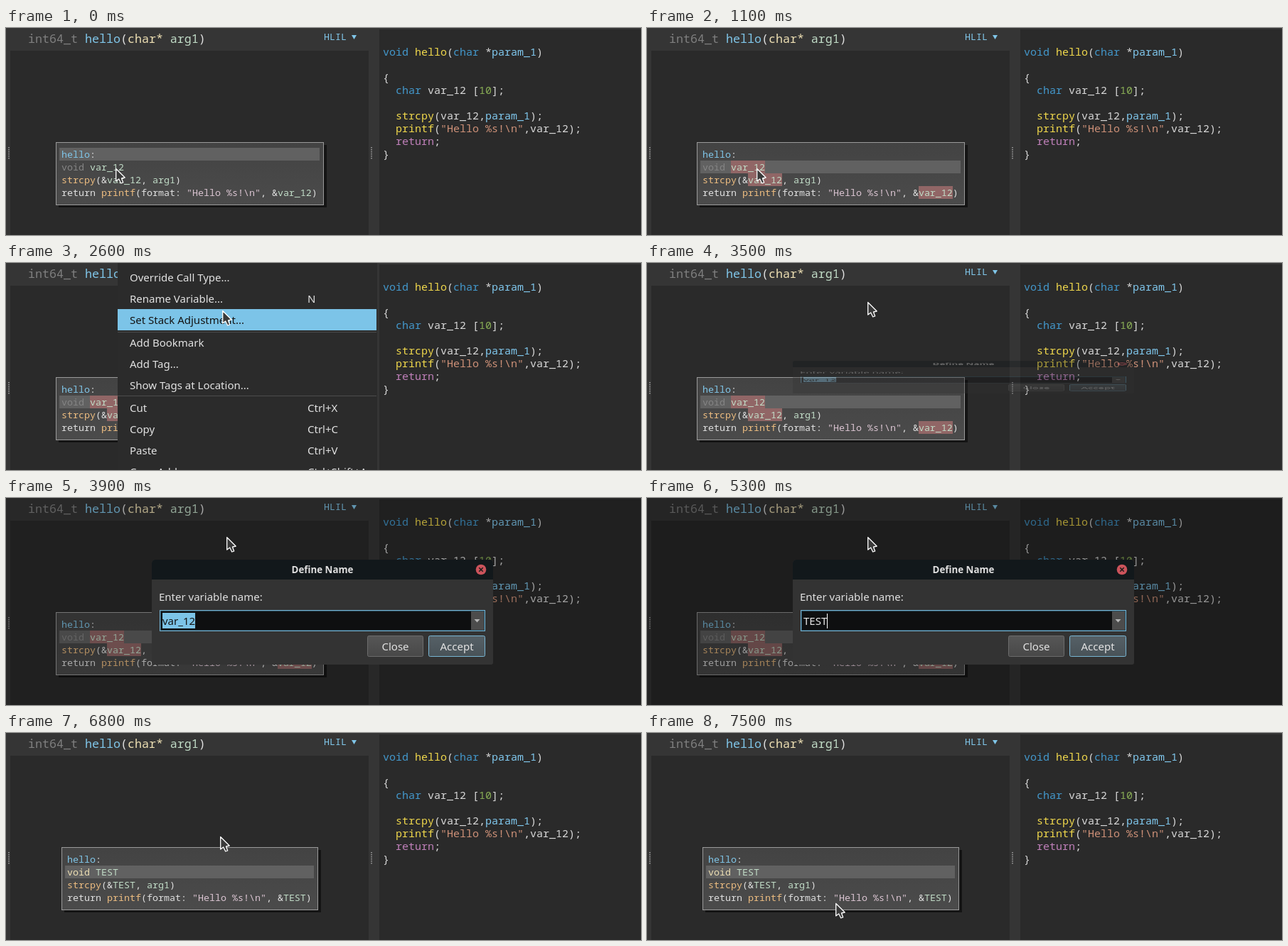
Write an HTML page with a canvas that moves like this. It is 893x292 px and loops after 8000 ms.

```html
<!DOCTYPE html>
<html lang="en">
<head>
<meta charset="utf-8">
<title>Rename a variable</title>
<style>
html, body { margin: 0; width: 100%; height: 100%; overflow: hidden; background: #2a2a2a; }
canvas { display: block; }
</style>
</head>
<body>
<canvas id="stage" width="893" height="292"></canvas>
<script>
const LOOP = 8000;
const MONO = '"Noto Sans Mono", "DejaVu Sans Mono", monospace';
const SANS = '"Noto Sans", "Open Sans", sans-serif';
const C = {
  text: '#e0e0e0', dim: '#7f7f7f', type: '#eddfb3', sym: '#80c6e9', vari: '#c1dcc7',
  imp: '#edbd81', str: '#dac4d1', kw: '#4398cc', fn: '#f0d84c', par: '#80c8ee',
  plain: '#d8d8d8', num: '#88ad55', lit: '#ce9178', ret: '#c080ba'
};
const screen = document.getElementById('stage').getContext('2d');
const layer = document.createElement('canvas');
layer.width = 893;
layer.height = 292;
const dialogCtx = layer.getContext('2d');
let g = screen;

function box(x, y, w, h, fill) {
  g.fillStyle = fill;
  g.fillRect(x, y, w, h);
}

function frame(x, y, w, h, color) {
  g.strokeStyle = color;
  g.lineWidth = 1;
  g.strokeRect(x + 0.5, y + 0.5, w - 1, h - 1);
}

function label(str, x, y, color, font, align = 'left') {
  g.font = font;
  g.textAlign = align;
  g.fillStyle = color;
  g.fillText(str, x, y);
}

// Coloured runs of monospaced text: color, string, color, string...
function code(x, y, size, ...runs) {
  const font = size + 'px ' + MONO;
  for (let i = 0; i < runs.length; i += 2) {
    label(runs[i + 1], x, y, runs[i], font);
    x += g.measureText(runs[i + 1]).width;
  }
}

function poly(pts, fill) {
  g.beginPath();
  for (let i = 0; i < pts.length; i += 2) g.lineTo(pts[i], pts[i + 1]);
  g.closePath();
  g.fillStyle = fill;
  g.fill();
}

function vertical(y0, y1, a, b) {
  const grad = g.createLinearGradient(0, y0, 0, y1);
  grad.addColorStop(0, a);
  grad.addColorStop(1, b);
  return grad;
}

function panels() {
  box(0, 0, 893, 292, '#353535');
  box(6, 32, 504, 260, '#2a2a2a');
  box(525, 2, 368, 290, '#2a2a2a');
  for (const x of [3, 513])
    for (let y = 168; y < 185; y += 3) box(x, y, 2, 1.5, '#8a8a8a');
  code(31, 21, 16.667, C.dim, 'int64_t ', C.sym, 'hello', C.text, '(', C.type, 'char* ', C.vari, 'arg1', C.text, ')');
  code(447, 17, 13.333, C.sym, 'HLIL');
  poly([486, 10, 493, 10, 489.5, 16], C.sym);
}

function decompiled() {
  const line = (i, ...runs) => code(530, 39 + 18 * i, 15, ...runs);
  line(0, C.kw, 'void ', C.fn, 'hello', C.plain, '(', C.kw, 'char ', C.plain, '*', C.par, 'param_1', C.plain, ')');
  line(2, C.plain, '{');
  line(3, C.kw, '  char ', C.plain, 'var_12 [', C.num, '10', C.plain, '];');
  line(5, C.fn, '  strcpy', C.plain, '(var_12,', C.par, 'param_1', C.plain, ');');
  line(6, C.fn, '  printf', C.plain, '(', C.lit, '"Hello %s!\\n"', C.plain, ',var_12);');
  line(7, C.ret, '  return', C.plain, ';');
  line(8, C.plain, '}');
}

function node(name, row, marked) {
  const w = 8 * (39 + name.length) + 17;
  const x = Math.floor(258.8 - w / 2), tx = x + 8;
  box(x + 4, 165, w, 88, '#141414');
  box(x, 161, w, 89, vertical(161, 250, '#434343', '#4b4b4b'));
  frame(x, 161, w, 89, '#9a9a9a');
  box(x + 5, 169 + 18 * row, w - 11, 18, '#616161');
  if (marked)
    [[5, 1], [8, 2], [38, 3]].forEach(([col, r]) => box(tx + 8 * col, 169 + 18 * r, 8 * name.length, 18, '#916666'));
  const line = (i, ...runs) => code(tx, 183 + 18 * i, 13.333, ...runs);
  line(0, C.sym, 'hello', C.text, ':');
  line(1, name === 'TEST' ? C.type : '#858585', 'void ', C.vari, name);
  line(2, C.imp, 'strcpy', C.text, '(&', C.vari, name, C.text, ', ', C.vari, 'arg1', C.text, ')');
  line(3, C.text, 'return ', C.imp, 'printf', C.text, '(format: ', C.str, '"Hello %s!\\n"', C.text, ', &', C.vari, name, C.text, ')');
}

const ITEMS = [
  ['Override Call Type...', 20], ['Rename Variable...', 50, 'N'], ['Set Stack Adjustment...', 80],
  ['Add Bookmark', 112], ['Add Tag...', 142], ['Show Tags at Location...', 172],
  ['Cut', 204, 'Ctrl+X'], ['Copy', 234, 'Ctrl+C'], ['Paste', 264, 'Ctrl+V'], ['Copy Address', 294, 'Ctrl+Shift+A']
];

function menu(tip) {
  box(157, 0, 365, 292, '#2b2b2b');
  box(157, 97, 364, 1, '#4c4c4c');
  box(157, 187, 364, 1, '#4c4c4c');
  const font = '15px ' + SANS;
  for (const [name, y, keys] of ITEMS) {
    const on = tip[0] > 157 && Math.abs(tip[1] - y) <= 15;
    if (on) box(157, y - 15, 364, 30, '#7cc4e8');
    const color = on ? '#141414' : '#e2e2e2';
    label(name, 174, y + 5.5, color, font);
    if (keys) label(keys, 424, y + 5.5, color, font);
  }
}

function button(x, w, name, top, bottom, edge) {
  g.beginPath();
  g.roundRect(x + 0.5, 194.5, w - 1, 29, 2);
  g.fillStyle = vertical(194, 224, top, bottom);
  g.fill();
  g.strokeStyle = edge;
  g.lineWidth = 1;
  g.stroke();
  label(name, x + w / 2, 215, '#e2e2e2', '15px ' + SANS, 'center');
}

function dialog(value, selected) {
  g.clearRect(0, 0, 893, 292);
  g.save();
  g.beginPath();
  g.roundRect(205, 87, 480, 148, [5, 5, 3, 3]);
  g.clip();
  box(205, 87, 480, 148, '#333333');
  box(205, 87, 480, 28, '#12181b');
  g.restore();
  label('Define Name', 445, 106, '#e0e0e0', 'bold 13.333px ' + SANS, 'center');
  g.beginPath();
  g.arc(668, 101, 7.3, 0, 7);
  g.fillStyle = '#cb535b';
  g.fill();
  g.strokeStyle = '#1c1c1c';
  g.lineWidth = 1.6;
  g.beginPath();
  for (const d of [-1, 1]) {
    g.moveTo(665.3, 101 - 2.7 * d);
    g.lineTo(670.7, 101 + 2.7 * d);
  }
  g.stroke();
  label('Enter variable name:', 215, 145, '#e0e0e0', '15px ' + SANS);
  box(216, 158, 458, 30, '#0e0f10');
  box(654, 159, 19, 28, '#4c4c4c');
  frame(216, 158, 458, 30, '#74b4d4');
  frame(217, 159, 456, 28, '#2b4a59');
  poly([658.5, 171, 666.5, 171, 662.5, 175.5], '#b5b5b5');
  const font = '15px ' + SANS;
  g.font = font;
  const end = 220 + g.measureText(value).width;
  if (selected) box(220, 162, end - 220, 22, '#7cc4e8');
  label(value, 220, 179, selected ? '#141414' : '#e8e8e8', font);
  if (!selected) box(Math.round(end), 163, 1, 21, '#ffffff');
  button(508, 79, 'Close', '#575757', '#484848', '#6c6c6c');
  button(594, 80, 'Accept', '#566167', '#485257', '#78b6d4');
}

// The dialog tips about its horizontal centre line as it opens.
function showDialog(t) {
  const value = t < 4500 ? 'var_12' : 'TEST'.slice(0, t < 5000 ? 1 : t < 5200 ? 3 : 4);
  g = dialogCtx;
  dialog(value, t < 4500);
  g = screen;
  const k = Math.min(1, (t - 3500) / 300);
  const ease = 1 - (1 - k) ** 2;
  g.save();
  g.globalAlpha = 0.32 + 0.68 * ease;
  g.translate(0, 161);
  g.scale(1, 0.31 + 0.69 * ease);
  g.drawImage(layer, 0, -161);
  g.restore();
}

function edgeOn() {
  const grad = g.createLinearGradient(205, 0, 690, 0);
  grad.addColorStop(0, '#0c0c0c');
  grad.addColorStop(0.45, '#202020');
  grad.addColorStop(0.85, '#4c4c4c');
  grad.addColorStop(1, 'rgba(60,60,60,0)');
  box(205, 162.5, 485, 3.5, grad);
}

function spinner(turn) {
  g.lineCap = 'round';
  g.lineWidth = 2;
  for (let i = 0; i < 12; i++) {
    const a = (i + turn) * Math.PI / 6, c = Math.cos(a), s = Math.sin(a);
    g.strokeStyle = `rgba(235,235,235,${0.2 + 0.8 * i / 11})`;
    g.beginPath();
    g.moveTo(16 + 5 * c, 14 + 5 * s);
    g.lineTo(16 + 9.5 * c, 14 + 9.5 * s);
    g.stroke();
  }
  g.lineCap = 'butt';
}

// Time, x, y of the pointer tip
const PATH = [
  [0, 154, 198], [2300, 146, 202], [2400, 196, 168], [2500, 262, 112], [2600, 304, 67],
  [2900, 307, 61], [3000, 310, 55], [6800, 301, 146], [7000, 282, 214],
  [7200, 277, 205], [7300, 265, 232], [7500, 265, 240]
];

function pointer([x, y]) {
  g.save();
  g.translate(x + 0.7, y + 0.5);
  poly([0, 0, 0, 17.5, 4, 14.5, 7, 20.5, 10, 19.5, 7.8, 13.5, 12.5, 12.5], '#3a3a3a');
  g.strokeStyle = '#ffffff';
  g.lineWidth = 1.3;
  g.lineJoin = 'round';
  g.stroke();
  g.restore();
}

function dimming(t) {
  if (t < 3500 || t >= 6200) return 0;
  if (t >= 6000) return t < 6100 ? 0.25 : 0.1;
  return 0.31 * Math.min(1, (t - 3500) / 500);
}

function draw(now) {
  const t = Math.floor(now % LOOP / 100) * 100;
  const [, ...tip] = PATH.filter(p => p[0] <= t).pop();
  g = screen;
  panels();
  decompiled();
  if (t < 6000) node('var_12', t < 1000 ? 0 : 1, t >= 1100);
  else node('TEST', 1, false);
  if (t >= 1800 && t < 3500) menu(tip);
  const dark = dimming(t);
  if (dark) box(0, 0, 893, 292, `rgba(0,0,0,${dark})`);
  if (t >= 3500 && t < 6000) showDialog(t);
  if (t === 6000) edgeOn();
  if (t >= 6000 && t < 6200) spinner((t - 6000) / 100 - 4);
  pointer(tip);
}

let start;
function tick(now) {
  if (start === undefined) start = now;
  draw(now - start);
  requestAnimationFrame(tick);
}
draw(0);
requestAnimationFrame(tick);
</script>
</body>
</html>
```
